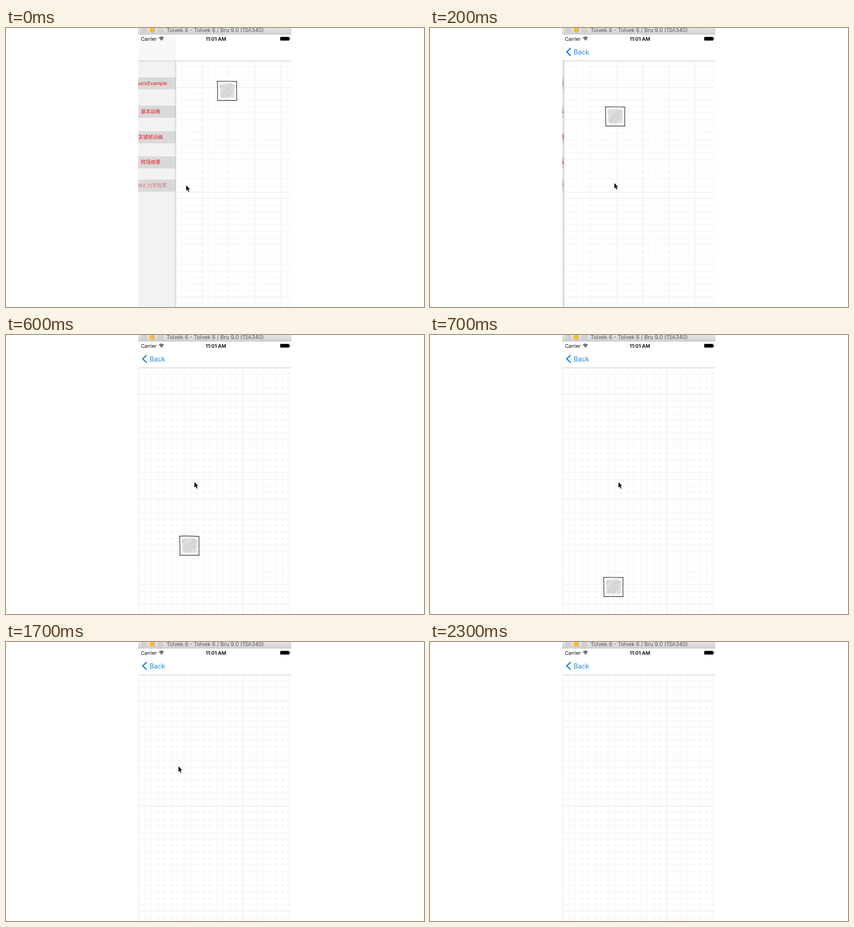
An HTML page for the animation above (2400 ms loop, 917 px wide and 611 px high).

```html
<!DOCTYPE html>
<html lang="zh-CN">
<head>
<meta charset="utf-8">
<style>
  html, body { margin: 0; width: 100%; height: 100%; overflow: hidden; background: #fff; }
  svg { display: block; font-family: Inter, "Noto Sans CJK SC", "Noto Sans CJK", sans-serif; }
  text { white-space: pre; }
  .light { fill: #d2d2d2; stroke: #bcbcbc; }
</style>
</head>
<body>
<svg width="917" height="611" viewBox="0 0 917 611">
  <defs>
    <clipPath id="screen"><rect x="290" y="14" width="336" height="597"/></clipPath>
    <linearGradient id="bar" x1="0" y1="0" x2="0" y2="1">
      <stop stop-color="#e4e4e4"/><stop offset="1" stop-color="#d3d3d3"/>
    </linearGradient>
    <linearGradient id="shade">
      <stop stop-color="#888" stop-opacity="0"/><stop offset="1" stop-color="#888" stop-opacity=".4"/>
    </linearGradient>
  </defs>

  <g clip-path="url(#screen)">
    <rect x="290" y="14" width="336" height="597" fill="#f2f2f2"/>
    <g id="menu" font-size="10.8" text-anchor="middle"></g>
    <g id="page">
      <rect x="-3" y="72" width="3" height="539" fill="url(#shade)"/>
      <rect y="14" width="336" height="597" fill="#fff"/>
      <path d="M.5 72V611" stroke="#e2e2e2"/>
      <g id="rows"></g>
      <g id="moving"></g>
      <g id="still"></g>
      <g id="box"></g>
    </g>
  </g>

  <!-- Translucent navigation bar -->
  <rect x="290" y="14" width="336" height="58" fill="#fff" opacity=".5"/>
  <path d="M290 72H626" stroke="#bcbcbc"/>
  <g id="back">
    <path d="M308.500 44L300 52.300L308.500 60.600" fill="none" stroke="#1a84de" stroke-width="2.700"/>
    <text x="315" y="57.500" font-size="14.500" fill="#1a84de">Back</text>
  </g>

  <rect x="290" width="336" height="13.500" fill="url(#bar)"/>
  <path d="M290 13.500H626" stroke="#b4b4b4"/>
  <circle class="light" cx="303" cy="4.500" r="5.200"/>
  <circle cx="321" cy="4.500" r="5.200" fill="#fdbd32" stroke="#e0a02c"/>
  <circle class="light" cx="339" cy="4.500" r="5.200"/>
  <text x="459" y="9" font-size="11.900" text-anchor="middle" fill="#555">Tolvek 6 - Tolvek 6 / Bru 9.0 (13A340)</text>

  <text x="296" y="27.500" font-size="10.600">Carrier</text>
  <g fill="none" stroke="#000" stroke-width="1.500">
    <path d="M336 22.200Q341 17.800 346 22.200M338 24.500Q341 21.800 344 24.500"/>
  </g>
  <path d="M339.300 25.800Q341 24.400 342.700 25.800L341 27.600Z"/>
  <text x="460.500" y="27.500" font-size="10.900" font-weight="600" text-anchor="middle">11:01 AM</text>
  <rect x="601.500" y="19.500" width="20" height="8" rx="1.500"/>
  <rect x="622" y="22" width="1.300" height="3" rx=".6"/>

  <path id="cursor" d="M.5 .5V12.500L3.200 10L5.300 14.800L7 14L5 9.200H8.500Z"
    stroke="#fff" stroke-width="1.200" paint-order="stroke"/>
</svg>

<script>
const $ = id => document.getElementById(id);
const LEFT = 290.5, CELL = 14.4;

function add(parent, tag, attrs, text = "") {
  const el = document.createElementNS("http://www.w3.org/2000/svg", tag);
  for (const key in attrs) el.setAttribute(key, attrs[key]);
  el.textContent = text;
  $(parent).append(el);
}
const stroke = (parent, d, color, more) =>
  add(parent, "path", { d, stroke: color, fill: "none", ...more });

// Menu buttons
[["QuickExample", 121], ["基本动画", 183], ["关键帧动画", 239], ["转场效果", 294], ["UIKit 力学效果", 345]]
  .forEach(([label, y], i) => {
    add("menu", "rect", { x: -80, y: y - 13, width: 160, height: 26.5, fill: "#d9d9d9" });
    add("menu", "text", { y: y + 4, fill: i < 4 ? "#e31b20" : "#dc7478" }, label);
  });

// Graph paper
for (let i = 1; i < 38; i++) {
  const y = Math.round(72 + i * CELL) - 0.5;
  stroke("rows", `M0 ${y}H336`, i % 16 === 4 ? "#e4e4e4" : "#f0f0f0");
}
for (let i = 1; i < 24; i++) {
  const d = `M${Math.round(i * CELL)} 72V611`;
  stroke("still", d, i === 16 ? "#e4e4e4" : "#f0f0f0");
  if (i % 4) stroke("moving", d, "#f5f5f5", { "stroke-dasharray": "9 5.4", "stroke-dashoffset": -3 });
  else stroke("moving", d, "#e8e8e8");
}

// Pencil-sketched square
let seed = 7;
const rand = () => (seed = seed * 16807 % 2147483647) / 2147483647;
add("box", "rect", { width: 43, height: 43, fill: "#fff", opacity: 0.4 });
add("box", "rect", { x: 5, y: 4, width: 34, height: 34, rx: 8, fill: "#dcdcdc", opacity: 0.5 });
for (let sum = 14; sum < 74; sum += 3.2) {
  const x1 = Math.max(4, sum - 38) + rand() * 5;
  const x2 = Math.min(39, sum - 4) - rand() * 5;
  stroke("box", `M${x1} ${sum - x1}L${x2} ${sum - x2}`, "#b8b8b8",
    { "stroke-width": 0.8 + rand() * 1.8, opacity: 0.45 });
}
stroke("box", "M.4 .8Q20 .2 43 1.300Q42.600 20 43 42.800Q22 42.300 1 42.800Q1.300 20 .4 .8Z", "#333",
  { "stroke-width": 1.4 });

// Pointer path: step, x, y
const route = [
  [0, 395, 344], [2, 404, 339], [4, 413, 321.5], [13, 413, 322], [14, 403, 308],
  [15, 381, 277], [16, 381, 277], [19, 371.5, 261], [22, 344, 256], [24, 344, 256]
];
function pointer(n) {
  const i = route.findIndex(p => p[0] > n);
  const [a, x, y] = route[i - 1], [b, x2, y2] = route[i];
  const k = (n - a) / (b - a);
  return [x + (x2 - x) * k, y + (y2 - y) * k];
}
const move = (id, x, y) => $(id).setAttribute("transform", `translate(${x} ${y})`);
const show = (id, opacity) => $(id).setAttribute("opacity", opacity);

function draw() {
  const n = Math.floor(performance.now() % 2400 / 100);

  // The page slides in on a critically damped spring
  const w = 2.72 + 1.94 * n;
  const slide = 335 * (1 + w) * Math.exp(-w);
  const sliding = n < 3;
  move("page", sliding ? LEFT + slide : 290, 0);
  move("menu", 292.6 + 0.3 * slide, 0);
  show("moving", sliding ? 1 : 0);
  show("still", sliding ? 0 : 1);
  show("back", Math.min(1, n / 2));

  const fall = 116 + 28 * n + 7 * n * (n - 2) - 0.257 * n * (n - 2) * (n - 4);
  move("box", 90.5, n < 8 ? fall : 700);

  move("cursor", ...pointer(n));
  show("cursor", n < 23 ? 1 : 0);
  requestAnimationFrame(draw);
}
draw();
</script>
</body>
</html>
```
